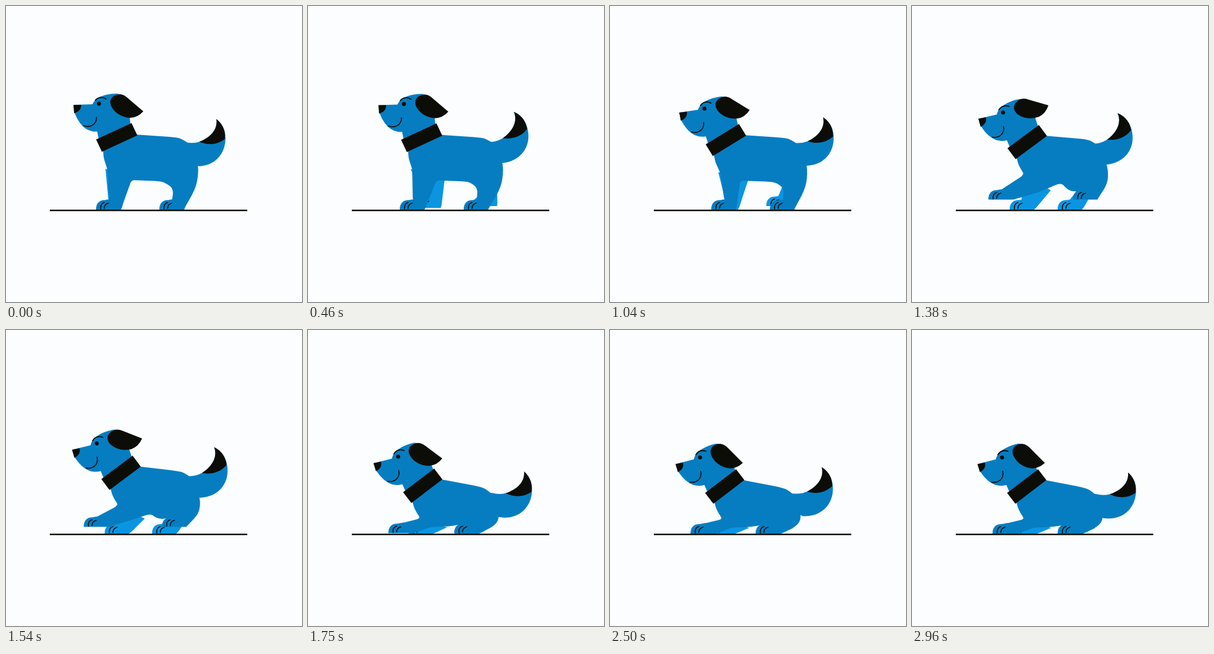
These frames come from a looping animation (500x500 px, 3000 ms). An HTML page with a canvas:

```html
<!DOCTYPE html>
<html>
<head>
<meta charset="utf-8">
<style>
html, body { margin: 0; width: 100%; height: 100%; overflow: hidden; background: #fcfdff; }
canvas { display: block; }
</style>
</head>
<body>
<canvas id="stage" width="500" height="500"></canvas>
<script>
const ctx = document.getElementById('stage').getContext('2d');
const LOOP = 3000, GROUND = 344;
const BLUE = '#067dc1', FAR = '#0b95e1', INK = '#0d0d08', PAPER = '#fcfdff';

function ease(t, from, to) {
  const p = Math.min(1, Math.max(0, (t - from) / (to - from)));
  return p * p * (3 - 2 * p);
}

function turn(x, y, deg) {
  const a = deg * Math.PI / 180, c = Math.cos(a), s = Math.sin(a);
  return [x * c - y * s, x * s + y * c];
}

const add = ([x, y], dx, dy) => [x + dx, y + dy];
const mix = (a, b, k) => [a[0] + (b[0] - a[0]) * k, a[1] + (b[1] - a[1]) * k];

function fill(d, color) {
  ctx.fillStyle = color;
  ctx.fill(new Path2D(d));
}

function stroke(d, width) {
  ctx.strokeStyle = INK;
  ctx.lineWidth = width;
  ctx.stroke(new Path2D(d));
}

// Put the shape's own pivot on a point, turned by deg
function placed([x, y], deg, [px, py], draw) {
  ctx.save();
  ctx.translate(x, y);
  ctx.rotate(deg * Math.PI / 180);
  ctx.translate(-px, -py);
  draw();
  ctx.restore();
}

// Corners are [point, share of each side that is rounded off]
function softPolygon(corners, color) {
  const n = corners.length;
  ctx.beginPath();
  corners.forEach(([p, round = 0], i) => {
    ctx.lineTo(...mix(p, corners[(i + n - 1) % n][0], round));
    ctx.quadraticCurveTo(...p, ...mix(p, corners[(i + 1) % n][0], round));
  });
  ctx.fillStyle = color;
  ctx.fill();
}

function paw(toe, color) {
  placed(toe, 0, [0, 0], () => {
    fill('M0 0C0 -10 5 -16 14 -16L26 -18L42 0Z', color);
    stroke('M8 -1Q7 -10 14 -12M14 -2Q14 -9 21 -11', 1.6);
  });
}

function farLeg(left, right, toe) {
  softPolygon([[left], [right], [add(toe, 42, 0), .12], [add(toe, 18, 0)], [add(toe, 20, -16)]], FAR);
  paw(toe, FAR);
}

function drawTail() {
  fill('M292 232L304 231Q316 233 327 229C343 222 358 208 354 189' +
       'C367 198 372 212 371 226C370 253 349 273 318 270L296 258Z', BLUE);
  fill('M327 229C343 222 358 208 354 189C367 198 371 211 370 222C357 233 342 234 327 229Z', INK);
}

function drawHead(earTurn) {
  fill('M114 167L146 166Q150 157 160 153Q172 148 188 148Q205 152 207 170L210 198L208 208' +
       'L158 232L154 212Q145 213 136 208Q124 201 116 181Z', BLUE);
  fill('M114 167L127 167Q127 178 115 181Z', INK);
  stroke('M131 202C140 206 153 202 153 188', 1.6);
  stroke('M151 159Q159 151 169 157', 1.8);
  ctx.beginPath();
  ctx.arc(157, 165, 3.4, 0, 7);
  ctx.fill();
  placed([190, 162], earTurn, [190, 162], () =>
    fill('M193 149Q200 150 205 155L232 178Q222 189 209 189Q188 187 178 170Q173 158 182 152Q188 149 193 149Z', INK));
  placed([187, 222], -25, [0, 0], () => fill('M-33 -11.5h66v23h-66Z', INK));
}

function draw(t) {
  const shift = ease(t, 0, 460), lean = ease(t, 460, 1040);
  const reach = ease(t, 1040, 1380), crouch = ease(t, 1380, 1800);
  const move = (base, a, b, c, d) => base + a * shift + b * lean + c * reach + d * crouch;

  // Everything hangs on the withers: the torso pitches and the neck turns around it
  const withers = [move(217, 5, 3, -2, -1), move(217, .5, .5, 1, 34)];
  const pitch = reach + 6 * crouch;
  const neck = -6.5 * lean - 5 * reach - crouch;
  const torso = (x, y) => add(withers, ...turn(x, y, pitch));
  const chest = (x, y) => add(withers, ...turn(x, y, neck));

  const nearY = GROUND - 17 * (reach - crouch);
  const front = [move(152, 3, 16, -42, 7), nearY];
  const hind = [move(259, 4, 7, 2, -26), nearY];
  const farFront = [move(153, 30, -8, -10, 5), GROUND - 3 * (shift - lean)];
  const farHind = [move(260, 18, -14, -18, 2), GROUND - 6 * (shift - reach)];

  const bellyY = move(77, 0, 0, 18, -13);
  const elbow = chest(-46, 58);
  const rump = torso(109, 50);
  const hindHeel = add(hind, 41, 0);

  const phase = t < 1040 ? t / 1250 : (t - 1140) / 600;
  const wag = -5.5 + 3.5 * crouch + 8.5 * Math.cos(2 * Math.PI * phase);
  const earTurn = -2.5 * lean - 10.5 * reach + 30 * ease(t, 1380, 1950);

  ctx.fillStyle = PAPER;
  ctx.fillRect(0, 0, 500, 500);
  ctx.lineCap = 'round';

  farLeg(torso(73, 70), torso(97, 70), farHind);
  farLeg(add(elbow, -3, 0), torso(move(-8, 17, 0, 4, 10), bellyY - 3), farFront);
  placed(torso(82 + 5 * crouch, 18), wag, [300, 236], drawTail);
  softPolygon([
    [chest(-53, 26)],
    [chest(-52, 40), .3],
    [elbow, .2],
    [add(front, 22, -17), .08],
    [add(front, 42, 0)],
    [torso(-5, bellyY), .1],
    [torso(move(46, 3, 3, -22, -15), 79), .25],
    [add(hind, 24 - 28 * reach, 25 * reach - 37), .5],
    [add(hind, 22, -17), .1],
    [hindHeel],
    [add(mix(rump, hindHeel, .45), 8, 3), .4],
    [rump, .45],
    [torso(93, 15), .4],
    [torso(74, 5), .25],
    [withers]
  ], BLUE);
  paw(hind, BLUE);
  paw(front, BLUE);
  placed(withers, neck, [217, 217], () => drawHead(earTurn));

  ctx.fillStyle = INK;
  ctx.fillRect(74, 344, 333.5, 2.5);
}

const start = performance.now();
function tick() {
  draw((performance.now() - start) % LOOP);
  requestAnimationFrame(tick);
}
tick();
</script>
</body>
</html>
```
